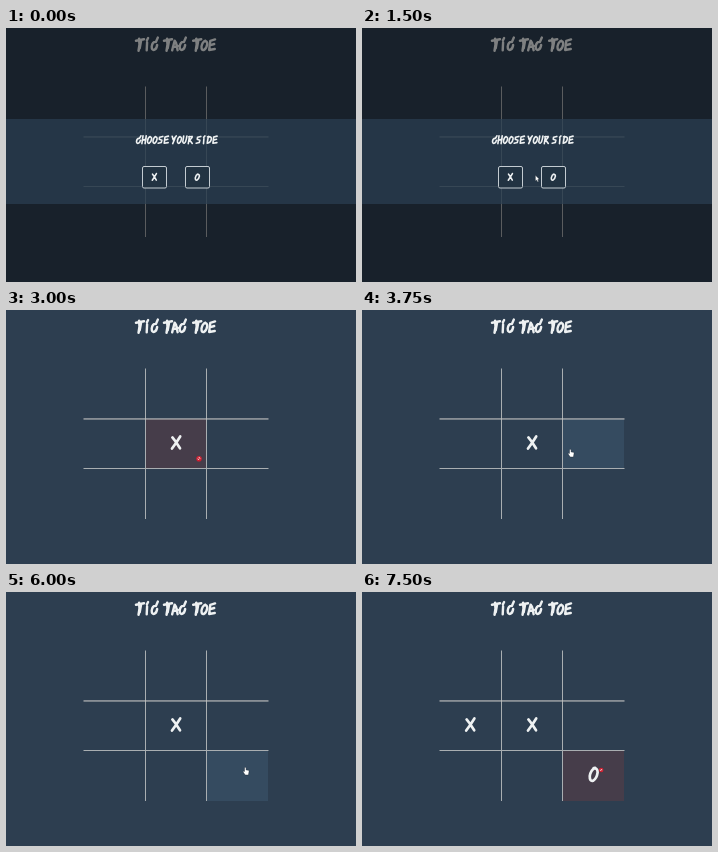
Recreate the animation shown at these times as an HTML page. Size 350 px wide and 254 px high, loop 8 s.

```html
<!DOCTYPE html>
<html lang="en">
<head>
<meta charset="utf-8">
<title>Tic Tac Toe</title>
<style>
html, body { margin: 0; width: 100%; height: 100%; overflow: hidden; background: #2d3e50; }
svg { display: block; width: 350px; height: 254px; }
.ink path { fill: none; stroke: currentColor; stroke-linecap: round; stroke-linejoin: round; vector-effect: non-scaling-stroke; }
.ink { color: #eef1f2; }
</style>
</head>
<body>
<svg viewBox="0 0 350 254" role="img" aria-label="Tic Tac Toe: choose your side, X or O">
  <rect width="350" height="254" fill="#2d3e50"/>
  <rect id="mid" x="140" y="109" width="60" height="49"/>
  <rect id="right" x="201" y="109" width="61" height="49"/>
  <rect id="corner" x="201" y="159" width="61" height="50"/>
  <g fill="#a9aeb1">
    <rect x="139" y="58.5" width="1" height="150.5"/>
    <rect x="200" y="58.5" width="1" height="150.5"/>
    <rect x="77.5" y="108.4" width="185" height="1.1" fill="#c4c4c2"/>
    <rect x="77.5" y="158" width="185" height="1"/>
  </g>
  <g id="title" class="ink"></g>
  <g id="marks" class="ink"></g>
  <g id="dialog">
    <rect width="350" height="254" fill="#000" opacity=".47"/>
    <rect y="91" width="350" height="85" fill="#2a3f52" opacity=".72"/>
    <g id="prompt" class="ink"></g>
    <g id="btnX" class="ink"></g>
    <g id="btnO" class="ink"></g>
  </g>
  <g id="arrow"><path d="M.4 .3V6L1.7 5L2.6 7L3.6 6.5L2.8 4.6L4.4 4.3Z" fill="#fff" stroke="#17212b" stroke-width=".35"/></g>
  <g id="hand"><path d="M1.5 .7Q2.3 -.1 3.1 .8V2.9L5.4 3.3Q6.3 3.7 6 4.8L5.4 8H2.2L.2 5.1Q0 4 1 4.1L1.5 4.6Z" fill="#fff" stroke="#17212b" stroke-width=".4"/></g>
  <g id="stop">
    <circle r="2.1" fill="#fbe9ea" stroke="#cc1f30" stroke-width="1.4"/>
    <path d="M-1.4 -1.4L1.4 1.4" stroke="#cc1f30" stroke-width="1.2"/>
  </g>
</svg>
<script>
const $ = id => document.getElementById(id);
const LOOP = 8000;

// Brush lettering, each letter in a 10 by 10 box
const GLYPHS = {
  T: "M0 2L10 .8M3.8 .4L4.4 5L3.2 10M6.4 1.4L4.6 8",
  I: "M7 .2L4.6 2M5 3.6L4.2 10",
  C: "M9.8 0L7 3.4Q2 3 1 7Q1 10 4.6 9.6Q8 9 8.8 5.8",
  A: "M.8 10L4.4 .8L6.4 3L8.6 9.8M1.8 7L9.2 5.8",
  O: "M6.4 1Q2.2 2 1 6.4Q.8 10.2 4.4 9.6Q8.4 8 9.2 4Q9.2 1 5 1.2",
  E: "M9.8 .4L3 1.6L1.4 9.6L9.4 8.8M2 5.6L8.6 4.4",
  H: "M3 0L.8 10M9.4 0L7.2 10M1 6L9.4 4.2",
  S: "M9.6 .8L3.2 1.8L2.4 4.4L7.8 5.6L6.6 8.6L.4 9.6",
  Y: "M1.6 .6L3.6 5L9.6 .2M7 3.4L2.6 10",
  U: "M2.6 .4L.8 7.6Q1.4 10 4 9.4Q7 8.6 9 .4",
  R: "M3 1L.8 10M1.8 1.4L8.4 .8Q9.8 2.4 3.4 5.4L8.8 9.8",
  D: "M3 1L.8 9.6Q8 9 9.2 4Q9.4 .6 1.6 1.2",
  X: "M1.4 1L4.4 4L9 9.6M9.2 .2L5 5.4L1 9.8"
};

function glyph(ch, x, y, w, h, weight) {
  return `<path d="${GLYPHS[ch]}" stroke-width="${weight}" transform="translate(${x} ${y}) scale(${w / 10} ${h / 10})"/>`;
}

function word(text, x, y, step, w, h, weight) {
  return [...text].map((ch, i) => glyph(ch, x + i * step, y, w, h, weight)).join("");
}

function titleWord(text, x) {
  const [a, b, c] = text;
  const narrow = b === "I";
  return glyph(a, x, 10.2, 8, 12.6, 2.5) +
    glyph(b, x + (narrow ? 8.6 : 7.6), narrow ? 9.8 : 11.8, narrow ? 5 : 7, narrow ? 12.6 : 10.6, 2.4) +
    glyph(c, x + 15, c === "C" ? 9.6 : 11, 7, c === "C" ? 12.8 : 11.4, 2.4);
}

$("title").innerHTML = titleWord("TIC", 130) + titleWord("TAC", 158) + titleWord("TOE", 187.2);
$("prompt").innerHTML = word("CHOOSE", 130, 107.8, 5.5, 5, 7.8, 1.6) +
  word("YOUR", 165.4, 107.8, 5.5, 5, 7.8, 1.6) +
  word("SIDE", 190, 107.8, 5.4, 5, 7.8, 1.6);

function button(id, ch, x) {
  $(id).innerHTML = `<rect x="${x + .5}" y="138.5" width="24" height="21.5" rx="1.5" stroke="#c3cbd1"/>` +
    glyph(ch, x + 9.8, 145.4, 5, 7, 1.6);
}
button("btnX", "X", 136);
button("btnO", "O", 179);

$("marks").innerHTML = [["X", 165, 126.2, 10, 12.6], ["O", 226.8, 174.4, 9.6, 15], ["X", 103.2, 126.2, 10, 12.6]]
  .map(m => `<g>${glyph(...m, 2.7)}</g>`).join("");
const [centreX, cornerO, leftX] = $("marks").children;

// Pointer stops: time, shape, x, y, scale
const POINTER = [
  [0, "none", 0, 0],
  [250, "arrow", 164, 219],
  [500, "arrow", 151, 177],
  [750, "hand", 148, 156],
  [1000, "hand", 148, 152],
  [1250, "hand", 156, 150],
  [1500, "arrow", 173, 147],
  [1750, "hand", 181, 147],
  [2000, "hand", 188, 146],
  [2250, "hand", 189, 146],
  [2500, "hand", 190, 146],
  [3000, "stop", 193, 148.7],
  [3500, "stop", 198, 152],
  [3750, "hand", 206, 139],
  [4000, "hand", 226, 139.5],
  [4250, "hand", 233, 138],
  [4500, "hand", 234, 136],
  [5500, "hand", 234, 139],
  [5750, "hand", 236, 160],
  [6000, "hand", 237, 175],
  [6250, "stop", 239.2, 178, .8]
];

const show = (el, on) => el.setAttribute("visibility", on ? "visible" : "hidden");
const within = (t, a, b) => t >= a && t < b;

function paintCell(id, color, opacity) {
  $(id).setAttribute("fill", color);
  $(id).setAttribute("opacity", opacity);
}

function paintButton(id, hot) {
  $(id).style.color = hot ? "#26384a" : "#eef1f2";
  $(id).firstChild.setAttribute("fill", hot ? "#ecf0f1" : "#223342");
  $(id).firstChild.setAttribute("stroke", hot ? "#ecf0f1" : "#c3cbd1");
}

function draw(t) {
  const choosing = t < 3000;
  $("dialog").setAttribute("display", choosing ? "inline" : "none");
  paintButton("btnX", within(t, 750, 1500));
  paintButton("btnO", within(t, 1750, 3000));

  show(centreX, !choosing);
  show(cornerO, t >= 6250);
  show(leftX, t >= 6750);

  const blue = "#354b60", red = "#463d4a";
  const swap = within(t, 5750, 6000);
  paintCell("mid", red, within(t, 3000, 3750) ? 1 : 0);
  paintCell("right", blue, swap ? .5 : within(t, 3750, 5750) ? 1 : 0);
  paintCell("corner", t >= 7500 ? red : blue, swap ? .5 : t >= 6000 ? 1 : 0);

  const [, shape, x, y, size = 1] = POINTER.filter(p => p[0] <= t).pop();
  for (const id of ["arrow", "hand", "stop"]) show($(id), id === shape);
  if (shape !== "none") $(shape).setAttribute("transform", `translate(${x} ${y}) scale(${size})`);
}

const start = performance.now();
function tick(now) {
  draw(Math.max(0, now - start) % LOOP);
  requestAnimationFrame(tick);
}
draw(0);
requestAnimationFrame(tick);
</script>
</body>
</html>
```
